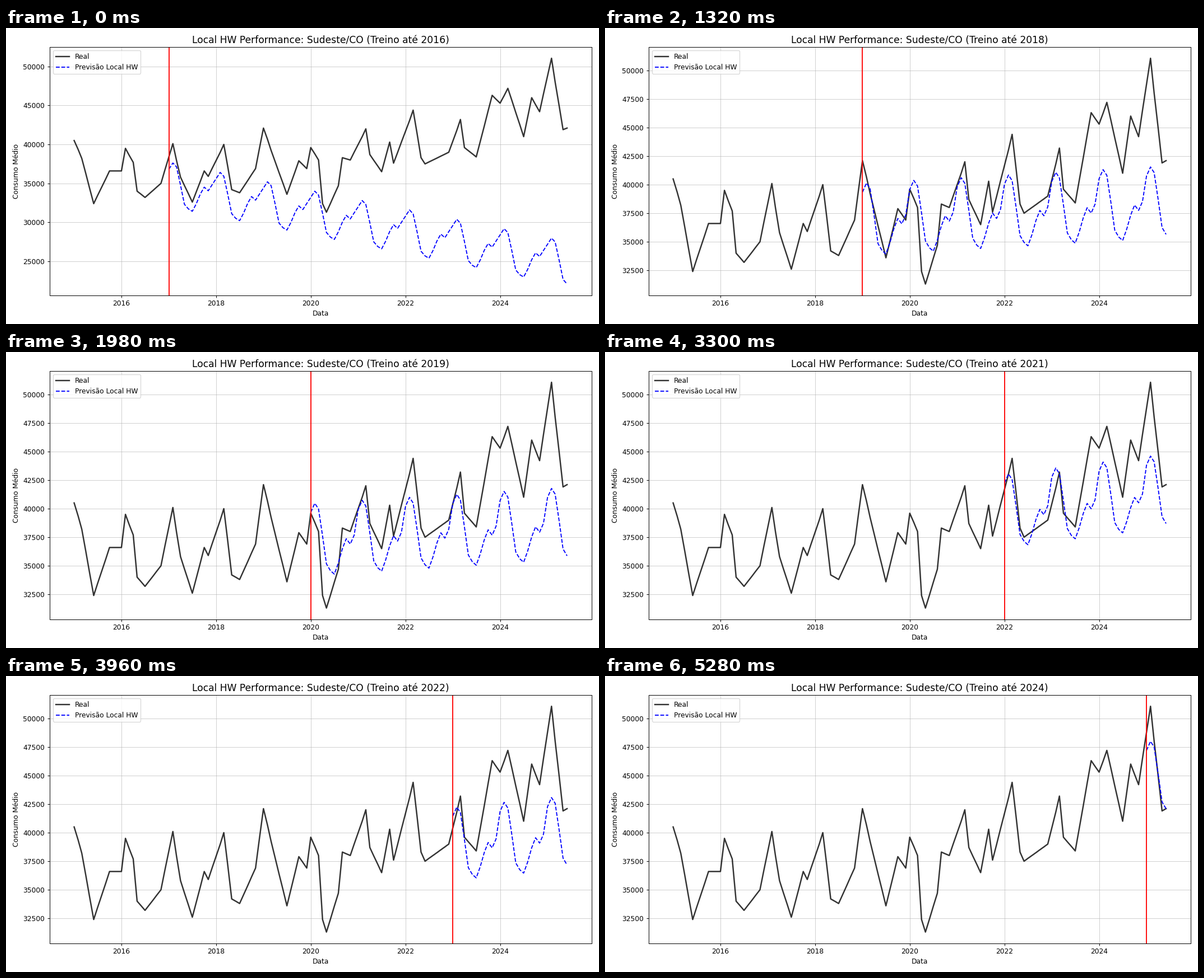
Recreate the animation shown at these times as a matplotlib script. Size 1058 px wide and 529 px high, loop 5.94 s.

```python
import numpy as np
import matplotlib.pyplot as plt
from matplotlib.animation import FuncAnimation

plt.rcParams["font.family"] = "DejaVu Sans"

WIDTH, HEIGHT = 1058, 529
DPI = HEIGHT / 6
FIRST_YEAR = 2015
N_MONTHS = 126
STEP_MS = 660

# Turning points of the measured load: (month, thousands)
TURNS = [
    (0, 40.5), (2, 38.2), (5, 32.4), (9, 36.6), (12, 36.6), (13, 39.5),
    (15, 37.7), (16, 34), (18, 33.2), (22, 35), (25, 40.1), (27, 35.8),
    (30, 32.6), (33, 36.6), (34, 35.9), (38, 40), (40, 34.2), (42, 33.8),
    (46, 36.9), (48, 42.1), (51, 37.8), (54, 33.6), (57, 37.9), (59, 36.9),
    (60, 39.6), (62, 38), (63, 32.4), (64, 31.3), (67, 34.7), (68, 38.3),
    (70, 38), (74, 42), (75, 38.7), (78, 36.5), (80, 40.3), (81, 37.6),
    (86, 44.4), (88, 38.3), (89, 37.5), (95, 39), (98, 43.2), (99, 39.6),
    (102, 38.4), (106, 46.3), (108, 45.3), (110, 47.2), (114, 41), (116, 46),
    (118, 44.2), (121, 51.06), (124, 41.9), (125, 42.1),
]
# Typical year around its mean, January to December
SEASON = 1000 * np.array([2.55, 3.35, 2.85, 0.5, -1.95, -2.55,
                          -2.85, -1.87, -0.63, 0.25, -0.22, 0.56])
# Last training year: (mean of the next year, drift per year)
MODELS = {
    2016: (34270, -1205), 2017: (36250, 259), 2018: (36790, 235),
    2019: (37120, 260), 2020: (38880, 570), 2021: (39690, 520),
    2022: (38890, 415), 2023: (46100, 500), 2024: (44640, 0),
}
YEARS = list(MODELS)

months = np.arange(N_MONTHS)
dates = (np.datetime64(f"{FIRST_YEAR}-01") + months).astype("datetime64[D]")
real = 1000 * np.interp(months, *zip(*TURNS))


def forecast(year):
    """Dates and values from January after the training year onwards."""
    level, drift = MODELS[year]
    start = 12 * (year + 1 - FIRST_YEAR)
    step = np.arange(N_MONTHS - start)
    return dates[start:], level + SEASON[step % 12] + drift * (step // 12)


fig, ax = plt.subplots(figsize=(12, 6), dpi=DPI)
fig.subplots_adjust(left=77.6 / WIDTH, right=1045 / WIDTH,
                    bottom=1 - 477.8 / HEIGHT, top=1 - 33.9 / HEIGHT)


def draw(i):
    year = YEARS[i]
    ahead, values = forecast(year)
    ax.clear()
    ax.plot(dates, real, color="black", alpha=0.8, lw=2, label="Real")
    ax.plot(ahead, values, color="blue", ls="--", lw=1.5, label="Previsão Local HW")
    ax.axvline(ahead[0], color="red", lw=1.5)
    ax.set_title(f"Local HW Performance: Sudeste/CO (Treino até {year})", fontsize=14)
    ax.set_xlabel("Data")
    ax.set_ylabel("Consumo Médio")
    ax.grid(True, alpha=0.6)
    ax.legend(loc="upper left")


anim = FuncAnimation(fig, draw, frames=len(YEARS), init_func=lambda: None,
                     interval=STEP_MS, repeat=True, repeat_delay=0)
plt.show()
```
